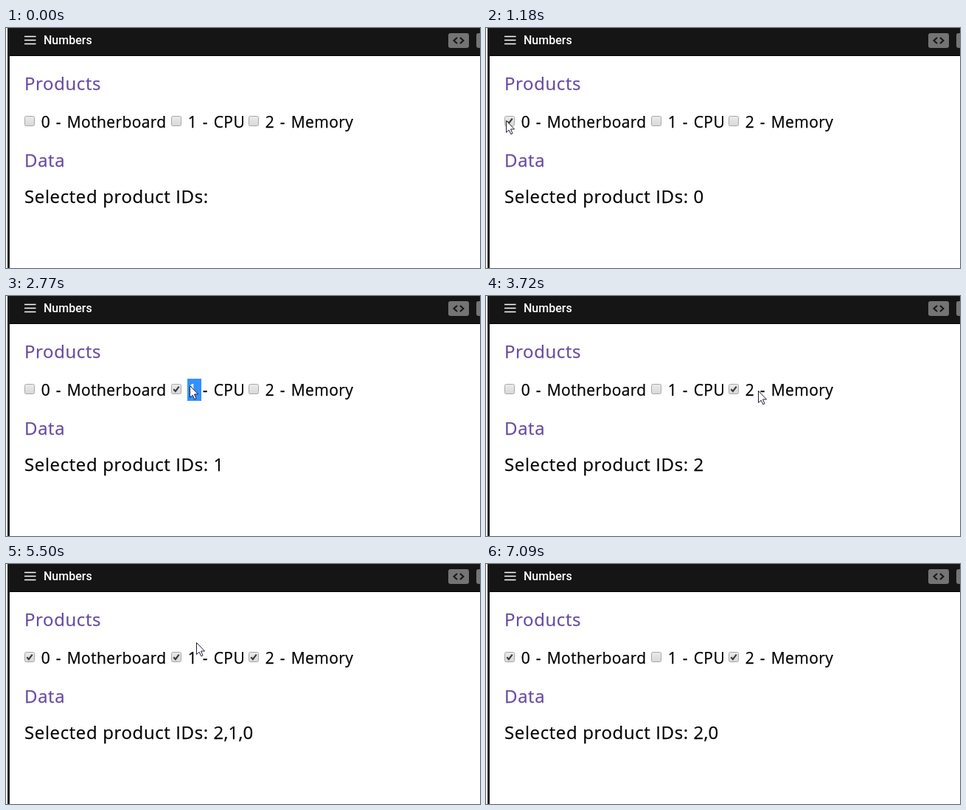
Write an HTML page that moves like this. It is 643x325 px and loops after 7.88 s.

```html
<!DOCTYPE html>
<html lang="en">
<head>
<meta charset="utf-8">
<title>Numbers</title>
<style>
  html, body { margin: 0; width: 100%; height: 100%; overflow: hidden; background: #fff; }
  svg { display: block; width: 643px; height: 325px; }
  text {
    font: 24px "Open Sans", "Noto Sans", sans-serif; letter-spacing: .63px; white-space: pre;
    fill: currentColor; stroke: currentColor; stroke-width: .25px;
  }
  tspan { fill: currentColor; stroke: currentColor; }
  .title { font: 500 16px Roboto, sans-serif; letter-spacing: 0; color: #fff; stroke: none; }
  .head { color: #674a9f; }
  .value { letter-spacing: .2px; }
  .label { font-size: 21px; letter-spacing: .4px; word-spacing: 1.8px; }
</style>
</head>
<body>
<svg viewBox="0 0 643 325">
  <defs>
    <linearGradient id="face" x2="0" y2="1">
      <stop stop-color="#ebebeb"/>
      <stop offset="1" stop-color="#d8d8d8"/>
    </linearGradient>
  </defs>
  <rect width="643" height="325" fill="#fff"/>
  <rect x="2" width="3" height="325" fill="#1c1c1e"/>
  <rect x="5" width="638" height="38" fill="#151515"/>
  <rect x="5" y="37" width="638" height="1"/>
  <path d="M25 11.5h15.5M25 16.5h15.5M25 21.5h15.5" stroke="#fff" stroke-width="1.5"/>
  <text class="title" x="51" y="22">Numbers</text>
  <g fill="#747474">
    <rect x="600" y="7" width="28" height="20" rx="3"/>
    <rect x="638" y="7" width="28" height="20" rx="3"/>
  </g>
  <path d="M612 13l-4.5 4 4.5 4M616 13l4.5 4-4.5 4" fill="none" stroke="#151515" stroke-width="2"/>
  <text class="head" x="25" y="84">Products</text>
  <text class="head" x="25" y="188">Data</text>
  <text x="25" y="237">Selected product IDs:</text>
  <text class="value" id="value" x="281.5" y="237"></text>
  <rect id="mark" x="246" y="112" width="19" height="30" fill="#3390ff"/>
  <g id="options"></g>
  <path id="cursor" d="M.5.5V16.5L4.2 13.2 6.8 18.8 9 17.8 6.5 12H11.5Z" fill="#fff" stroke="#1f2033"/>
</svg>
<script>
const LOOP = 7880, STEP = 70;
const $ = id => document.getElementById(id);
const show = (el, on) => el.setAttribute("visibility", on ? "visible" : "hidden");

// Every click toggles its box
const options = [
  { x: 25, name: "Motherboard", clicks: [1180, 1790, 4800] },
  { x: 224, name: "CPU", clicks: [2440, 2870, 4450, 6330] },
  { x: 329, name: "Memory", clicks: [3720] }
];

$("options").innerHTML = options.map((o, i) => `
  <g transform="translate(${o.x} 119)">
    <rect x=".5" y=".5" width="13" height="13" rx="2" fill="url(#face)" stroke="#a8a8a8"/>
    <path class="tick" d="M3.3 7.2l2.6 2.8 4.8-6.4" fill="none" stroke="#3c3c3c" stroke-width="2.1"/>
  </g>
  <text class="label" x="${o.x + 22.8}" y="135"><tspan class="num">${i}</tspan> - ${o.name}</text>`).join("");

const ticks = document.querySelectorAll(".tick");
const nums = document.querySelectorAll(".num");

// Each trip bends towards "via" and starts where the last one ended
const entry = [685, -25];
const trips = [
  { start: 360, end: 920, via: [-25, 92], to: [27, 125] },
  { start: 1400, end: 1640, via: [40, 126], to: [56, 127] },
  { start: 1790, end: 2440, via: [234, 113], to: [249, 121] },
  { start: 2870, end: 3360, via: [340, 50], to: [369, 128] },
  { start: 3790, end: 4450, via: [300, 118], to: [222, 124] },
  { start: 4520, end: 4800, via: [90, 121], to: [28, 125] },
  { start: 5290, end: 5500, via: [190, 108], to: [258, 106] },
  { start: 5650, end: 6330, via: [-172, 130], to: [238, 131] },
  { start: 6530, end: 7090, via: [250, 110], to: [600, -20] }
];

function cursorAt(t) {
  const i = trips.findLastIndex(trip => trip.start <= t);
  if (i < 0 || t >= trips.at(-1).end) return null;
  const { start, end, via, to } = trips[i];
  const from = i ? trips[i - 1].to : entry;
  const count = Math.floor((end - start) / STEP) + 1;
  const p = Math.min(1, (Math.floor((t - start) / STEP) + 1) / count);
  const q = 1 - p;
  return from.map((a, k) => Math.round(q * q * a + 2 * p * q * via[k] + p * p * to[k]));
}

// Checked ids, in the order they were last clicked
function selectedAt(t) {
  const past = options.map(o => o.clicks.filter(c => c <= t));
  return [...past.keys()]
    .filter(id => past[id].length % 2)
    .sort((a, b) => past[a].at(-1) - past[b].at(-1));
}

function draw(t) {
  const ids = selectedAt(t);
  ticks.forEach((tick, id) => show(tick, ids.includes(id)));
  $("value").textContent = ids.join(",");

  const marked = t >= 2770 && t < 2870;
  show($("mark"), marked);
  nums[1].style.color = marked ? "#fff" : "";

  const pos = cursorAt(t);
  show($("cursor"), pos);
  if (pos) $("cursor").setAttribute("transform", `translate(${pos})`);
}

const origin = performance.now();
function tick() {
  draw((performance.now() - origin) % LOOP);
  requestAnimationFrame(tick);
}
tick();
</script>
</body>
</html>
```
